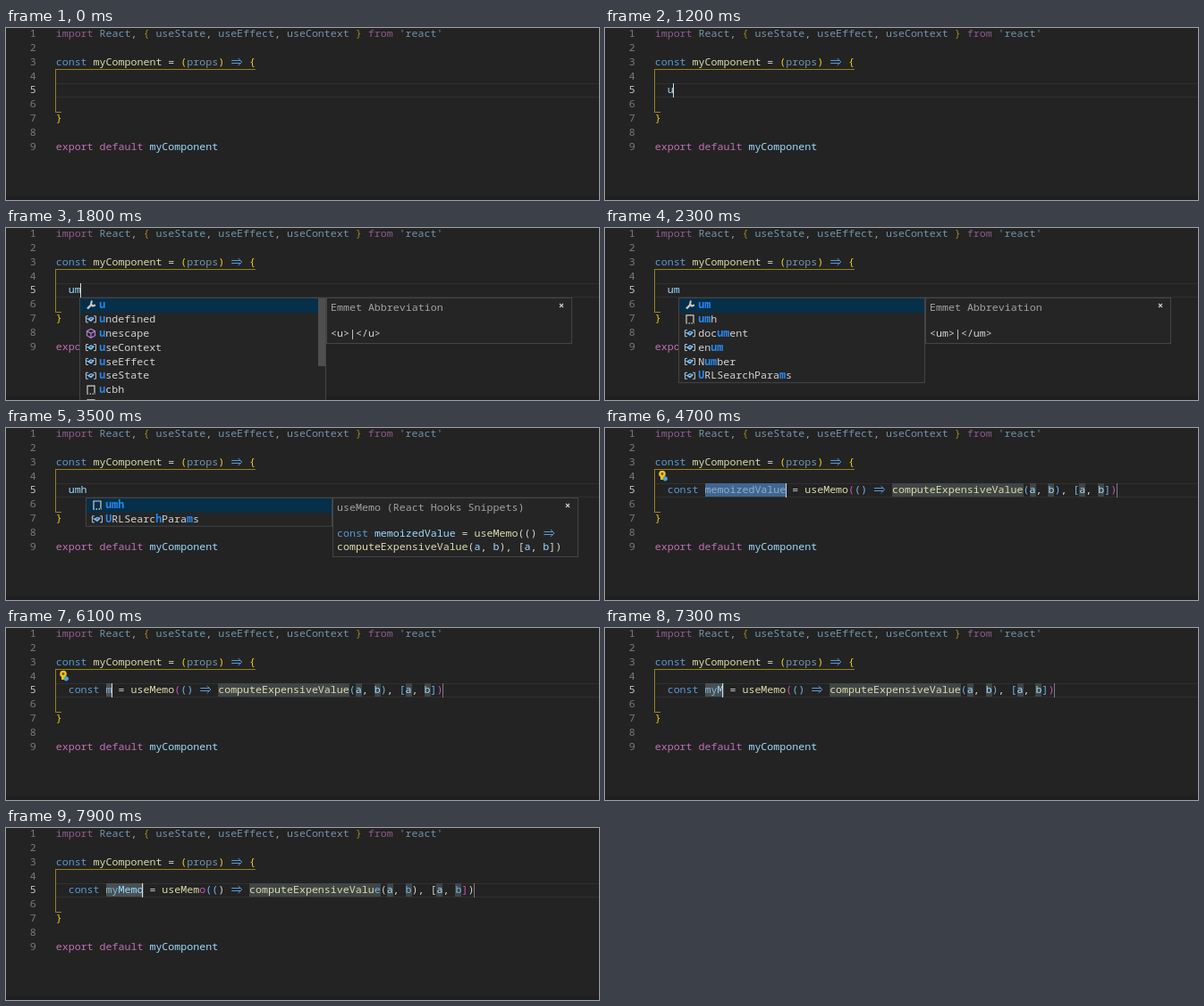
These frames come from a looping animation (663x193 px, 8 s). An HTML page with a canvas:

```html
<!DOCTYPE html>
<html lang="en">
<head>
<meta charset="utf-8">
<title>Code editor</title>
<style>
html, body { margin: 0; width: 100%; height: 100%; overflow: hidden; background: #232323; }
canvas { display: block; }
</style>
</head>
<body>
<canvas id="stage" width="663" height="193"></canvas>
<script>
const ctx = document.getElementById('stage').getContext('2d');
const LOOP = 8000, CW = 6.98, X0 = 55.7, ROW = 15.85;
const FONT = '11.63px "Noto Sans Mono", "DejaVu Sans Mono", monospace';
const C = {
  bg: '#232323', text: '#d4d4d4', kw: '#569cd6', pink: '#c46fb4', fn: '#dcdcaa',
  id: '#9cdcfe', dimId: '#7396aa', dimPink: '#8e5d8b', dimGold: '#a08c1c', dimText: '#a0a0a0',
  str: '#7391a8', gold: '#f2cf1d', orchid: '#c557b8', sky: '#6fb6ea', match: '#2688ee',
  panel: '#252526', edge: '#454545', word: '#404545', select: '#42658f'
};

const colX = col => X0 + col * CW;
const baseline = line => Math.round(10 + (line - 1) * ROW);

function rect(x, y, w, h, color) {
  ctx.fillStyle = color;
  ctx.fillRect(x, y, w, h);
}

function stroke(color, width, ...lines) {
  ctx.strokeStyle = color;
  ctx.lineWidth = width;
  ctx.beginPath();
  for (const pts of lines) pts.forEach(([x, y], i) => i ? ctx.lineTo(x, y) : ctx.moveTo(x, y));
  ctx.stroke();
}

function disc(x, y, r, color) {
  ctx.fillStyle = color;
  ctx.beginPath();
  ctx.arc(x, y, r, 0, 7);
  ctx.fill();
}

function panel(x, y, w, h) {
  rect(x, y, w, h, C.edge);
  rect(x + 1, y + 1, w - 2, h - 2, C.panel);
}

function text(str, x, y, color, bold) {
  ctx.font = (bold ? 'bold ' : '') + FONT;
  ctx.fillStyle = color;
  [...str].forEach((ch, i) => { if (ch !== ' ') ctx.fillText(ch, x + i * CW, y); });
}

function arrow(x, y, color) {
  const m = y - 4;
  stroke(color, 1, [[x + 1, m - 1.5], [x + 11, m - 1.5]], [[x + 1, m + 1.5], [x + 11, m + 1.5]],
    [[x + 8.5, m - 4], [x + 12.7, m], [x + 8.5, m + 4]]);
}

// Draws [text, colour] pairs one after another on the character grid.
function tokens(list, x, y) {
  for (const [str, color] of list) {
    if (str === '=>') arrow(x, y, color);
    else text(str, x, y, color);
    x += str.length * CW;
  }
}

const importLine = [
  ['import ', C.dimPink], ['React', C.dimId], [', ', C.dimText], ['{ ', C.dimGold],
  ['useState', C.dimId], [', ', C.dimText], ['useEffect', C.dimId], [', ', C.dimText],
  ['useContext', C.dimId], [' }', C.dimGold], [' from ', C.dimPink], ["'react'", C.str]
];
const headLine = [
  ['const ', C.kw], ['myComponent', C.fn], [' = ', C.text], ['(', C.gold], ['props', C.dimId],
  [') ', C.gold], ['=>', C.kw], [' {', C.gold]
];

function editor() {
  rect(0, 0, 663, 193, C.bg);
  rect(0, 188, 663, 5, '#1f1f1f');
  rect(56, 62, 607, 1, '#303030');
  rect(56, 77, 607, 1, '#303030');
  for (let n = 1; n <= 9; n++) text(String(n), 26.8, baseline(n), n === 5 ? '#c6c6c6' : '#7b7b7b');
  tokens(importLine, X0, baseline(1));
  tokens(headLine, X0, baseline(3));
  text('}', X0, baseline(7), C.gold);
  tokens([['export default ', C.pink], ['myComponent', C.id]], X0, baseline(9));
  const line = '#94801f';
  rect(55, 46, 224, 1, line);
  rect(55, 46, 1, 49, line);
  rect(55, 94, 7, 1, line);
}

function bulb() {
  disc(64, 51.5, 3.8, '#f0c419');
  rect(62, 54, 4, 4, '#f0c419');
  disc(64, 51.5, 1.4, '#6b5a18');
  disc(67.3, 56.8, 2.6, '#4aa3e0');
}

function statement(t, name) {
  const tail = ' = useMemo(() => computeExpensiveValue(a, b), [a, b])';
  const str = '  const ' + name + tail;
  const tailCol = 8 + name.length;
  const y = baseline(5);
  const mark = (col, len, color) => rect(Math.round(colX(col)), 62, Math.round(len * CW), 15, color);
  const find = part => tailCol + tail.indexOf(part);
  const call = find('compute'), open = find('(a'), list = find('[a');

  if (t >= 3800) {
    mark(call, 21, C.word);
    for (const col of [open + 1, open + 4, list + 1, list + 4]) mark(col, 1, C.word);
    rect(Math.round(colX(str.length)), 62, 1, 16, '#7c7c7c');
  }
  mark(8, name.length, t < 6100 ? C.select : '#485055');

  const colors = [...str].map((ch, i) => {
    if (i < 8) return C.kw;
    if (i < tailCol) {
      const dimmed = t < 6100 ? t >= 4200 : i < (t < 7100 ? 9 : 10);
      return dimmed ? '#86b2cc' : C.id;
    }
    if (i >= tailCol + 3 && i < tailCol + 10 || i >= call && i < open) return C.fn;
    return ch === 'a' || ch === 'b' ? C.id : C.text;
  });
  if (t >= 4000) {
    // Bracket colours trail the text by one column just after the last key.
    const lag = t >= 7900 ? 1 : 0;
    const outer = find('(('), last = str.length - 1;
    [...str].forEach((ch, i) => {
      if (i >= tailCol && '()[]'.includes(ch)) colors[i - lag] = i === outer || i === last ? C.orchid : C.sky;
    });
  }
  const fat = str.indexOf('=>');
  [...str].forEach((ch, i) => {
    if (i === fat) arrow(colX(i), y, C.kw);
    else if (i !== fat + 1) text(ch, colX(i), y, colors[i]);
  });
}

function icon(kind, x, y) {
  if (kind === 'wrench') {
    stroke('#c8c8c8', 2.4, [[x - 4, y + 4], [x + 1, y - 1]]);
    stroke('#c8c8c8', 2, [[x + 1, y - 5], [x, y - 1], [x + 2, y + 1], [x + 5, y]]);
  } else if (kind === 'cube') {
    stroke('#b180d7', 1.2,
      [[x, y - 5], [x + 4.5, y - 2.5], [x + 4.5, y + 2.5], [x, y + 5], [x - 4.5, y + 2.5], [x - 4.5, y - 2.5], [x, y - 5]],
      [[x - 4.5, y - 2.5], [x, y], [x + 4.5, y - 2.5]], [[x, y], [x, y + 5]]);
  } else if (kind === 'snippet') {
    stroke('#d0d0d0', 1.2, [[x - 4, y + 4], [x - 4, y - 4.5], [x + 4, y - 4.5], [x + 4, y + 4]]);
    ctx.setLineDash([1.5, 1.5]);
    stroke('#d0d0d0', 1.4, [[x - 4.5, y + 4.5], [x + 5, y + 4.5]]);
    ctx.setLineDash([]);
  } else {
    stroke('#c0c0c0', 1, [[x - 3, y - 3.5], [x - 5.5, y - 3.5], [x - 5.5, y + 3.5], [x - 3, y + 3.5]],
      [[x + 3, y - 3.5], [x + 5.5, y - 3.5], [x + 5.5, y + 3.5], [x + 3, y + 3.5]]);
    stroke('#75beff', 1.3, [[x - 3, y], [x, y - 2], [x + 3, y - 1], [x, y + 2], [x - 3, y], [x, y + 1], [x + 3, y - 1]]);
  }
}

// Each item is [icon, label, indices of the matched letters].
function suggestions(x, items, scroll) {
  panel(x, 78, 276, items.length * ROW + 1);
  rect(x + 1, 79, scroll ? 266 : 274, 16, '#062f4a');
  items.forEach(([kind, label, hits], row) => {
    const mid = 86.5 + row * ROW;
    icon(kind, x + 13, mid);
    [...label].forEach((ch, i) => {
      const hit = hits.includes(i);
      text(ch, x + 22.3 + i * CW, Math.round(mid + 3.7), hit ? C.match : C.text, hit);
    });
  });
  if (scroll) rect(x + 267, 79, 8, 76, '#4f4f4f');
}

function details(x, h, title, lines) {
  panel(x, 78, 275, h);
  text(title, x + 5, 93, '#a2a2a2');
  stroke('#cfcfcf', 1.1, [[x + 261, 85], [x + 265, 89]], [[x + 265, 85], [x + 261, 89]]);
  lines.forEach((line, i) => tokens(line, x + 5, 122 + i * 15));
}

const uItems = [
  ['wrench', 'u'], ['var', 'undefined'], ['cube', 'unescape'], ['var', 'useContext'], ['var', 'useEffect'],
  ['var', 'useState'], ['snippet', 'ucbh'], ['snippet', 'ueh']
].map(([kind, label]) => [kind, label, [0]]);
const umItems = [
  ['wrench', 'um', [0, 1]], ['snippet', 'umh', [0, 1]], ['var', 'document', [3, 4]],
  ['var', 'enum', [2, 3]], ['var', 'Number', [1, 2]], ['var', 'URLSearchParams', [0, 13]]
];
const umhItems = [['snippet', 'umh', [0, 1, 2]], ['var', 'URLSearchParams', [0, 8, 13]]];
const memoDoc = [
  [['const ', C.kw], ['memoizedValue', C.id], [' = ', C.text], ['useMemo', C.fn], ['(() ', C.text], ['=>', C.kw]],
  [['computeExpensiveValue', C.fn], ['(', C.text], ['a', C.id], [', ', C.text], ['b', C.id], ['), [', C.text],
    ['a', C.id], [', ', C.text], ['b', C.id], ['])', C.text]]
];

function popup(t) {
  const emmet = (x, tag) => details(x + 276, 52, 'Emmet Abbreviation', [[[`<${tag}>|</${tag}>`, C.text]]]);
  if (t < 1400 || t >= 3700) return;
  if (t < 1800) {
    suggestions(75, uItems, true);
    if (t >= 1600) emmet(75, 'u');
  } else if (t < 2600) {
    suggestions(82, t < 1900 ? uItems : umItems, t < 1900);
    emmet(82, t < 1900 ? 'u' : 'um');
  } else {
    suggestions(89, umhItems, false);
    details(365, 67, 'useMemo (React Hooks Snippets)', memoDoc);
  }
}

// Last entry whose start time has been reached.
const at = (steps, t) => steps.filter(([start]) => t >= start).pop()[1];

const typed = [[0, ''], [1200, 'u'], [1800, 'um'], [2600, 'umh']];
const names = [[3700, 'memoizedValue'], [6100, 'm'], [6700, 'my'], [7300, 'myM'], [7500, 'myMe'], [7600, 'myMem'], [7900, 'myMemo']];
const caret = [[0, 0], [300, 1], [800, 0], [1200, 1], [2300, 0], [2600, 1], [3500, 0], [3700, 1],
  [4500, 0], [4700, 1], [5200, 0], [5700, 1], [6500, 0], [6700, 1]];

function draw(t) {
  editor();
  let col;
  if (t < 3700) {
    const word = at(typed, t);
    text(word, colX(2), baseline(5), C.id);
    col = 2 + word.length;
  } else {
    const name = at(names, t);
    statement(t, name);
    col = 8 + name.length;
  }
  if (t >= 4500 && t < 6400) bulb();
  popup(t);
  if (at(caret, t)) rect(Math.round(colX(col)) - (col > 15 ? 0 : 1) + (col === 2 ? 1 : 0), 62, 1, 16, '#d8d8d8');
}

const begin = performance.now();
function tick() {
  draw((performance.now() - begin) % LOOP);
  requestAnimationFrame(tick);
}
tick();
</script>
</body>
</html>
```
